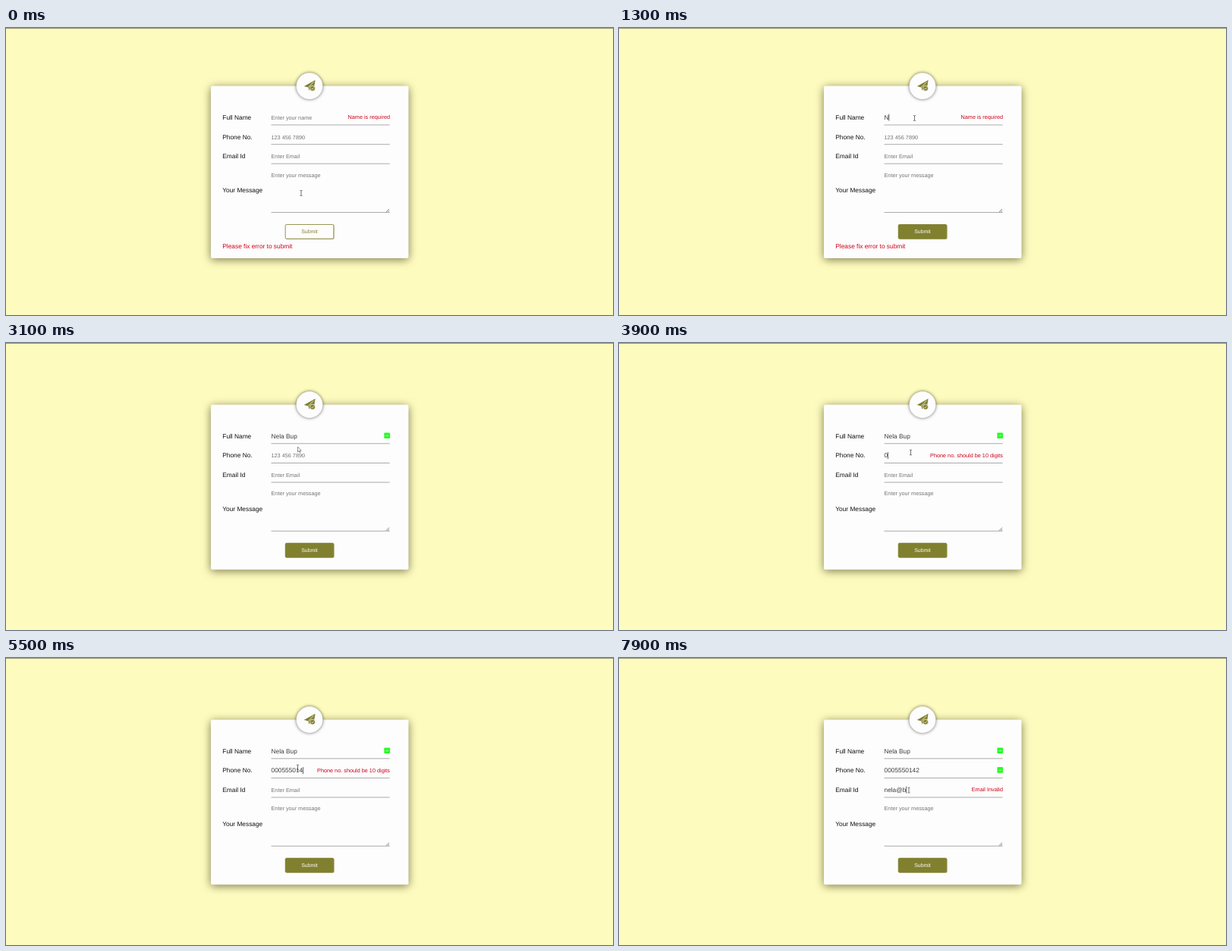
These frames come from a looping animation (800 by 379 pixels, 8000 ms). An HTML page:

```html
<!DOCTYPE html>
<html lang="en">
<head>
<meta charset="utf-8">
<title>Contact form</title>
<style>
  html, body { margin: 0; width: 100%; height: 100%; overflow: hidden; background: #fdfbbe; }
  svg { display: block; width: 100%; height: 100%; }
  text { font-family: "Liberation Sans", Arial, sans-serif; font-size: 8.33px; white-space: pre; text-rendering: geometricPrecision; }
  .label { fill: #111; }
  .hint { fill: #757575; font-size: 7.29px; }
  .value { fill: #3c3c3c; }
  .error { fill: #cc0018; }
  .small { font-size: 7.29px; text-anchor: end; }
  .rule { stroke: #a2a2a2; stroke-width: .9; }
  .card { fill: #fefdfe; filter: drop-shadow(0 2px 6px rgba(45, 43, 10, .62)); }
  .badge { fill: #fefdfe; filter: drop-shadow(0 .5px 2px rgba(0, 0, 0, .6)); }
</style>
</head>
<body>
<svg id="stage" viewBox="0 0 800 379" preserveAspectRatio="none">
  <rect width="800" height="379" fill="#fdfbbe"/>
  <rect width="800" height="1" fill="#98967a"/>
  <rect id="card" class="card" x="270" width="260.5" rx="2"/>
  <g id="form">
    <circle class="badge" cx="400" cy="76.7" r="17.4"/>
    <g fill="#80802f">
      <path d="M392.8 77 407.6 68.8 405.6 81 401.6 79.4 399.4 82.6 398.6 78.6Z"/>
      <path d="M398.4 78.4 405.5 71.2" stroke="#fefdfe" stroke-width=".8"/>
      <circle cx="404" cy="79.7" r="3.5" stroke="#fefdfe" stroke-width=".7"/>
      <path d="M402.4 79.8 403.6 81 405.7 78.6" fill="none" stroke="#fefdfe" stroke-width=".8"/>
    </g>
    <g id="fields"></g>
    <path d="M501 243 505 239M503.3 243 505 241.3" stroke="#555" stroke-width=".7"/>
    <rect x="368.4" y="259.6" width="64.4" height="19.6" rx="2" fill="#80802f" opacity=".45"/>
    <rect id="button" x="368.2" y="259.5" width="63.6" height="18.8" rx="1.5" stroke="#80802f" stroke-width=".8"/>
    <text id="submit" x="400" y="271.2" text-anchor="middle" style="font-size:6.94px">Submit</text>
    <text id="notice" class="error" x="285.3" y="291.4">Please fix error to submit</text>
  </g>
  <path id="caret" stroke="#222" stroke-width=".7"/>
  <g id="pointer">
    <path id="beam" d="M-1.6-3.4H-.5L0-3 .5-3.4H1.6M-1.6 3.4H-.5L0 3 .5 3.4H1.6M0-3V3" fill="none" stroke="#444" stroke-width=".75"/>
    <path id="arrow" d="M-.5-3.5V3.5L1.1 2 2.1 4.2 3.2 3.7 2.2 1.6H4.2Z" fill="#fff" stroke="#555" stroke-width=".65"/>
  </g>
</svg>
<script>
const LOOP = 8000, STEP = 100, LEFT = 349.5, RIGHT = 505.7;
const NOTICE_END = 1500, SHIFT = 4.8;
const $ = id => document.getElementById(id);

const fields = [
  { label: "Full Name", y: 121, hint: "Enter your name", text: "Nela Bup",
    focus: 800, blur: 3400, keys: [1200, 1400, 1500, 1700, 1900, 2200, 2400, 2600],
    status: n => n < 2 ? "Name is required" : n < 6 ? "Write full Name" : "ok" },
  { label: "Phone No.", y: 146.7, hint: "123 456 7890", text: "0005550142",
    focus: 3400, blur: 6700, keys: [3800, 4000, 4200, 4400, 4500, 4800, 5000, 5200, 5400, 5700],
    status: n => !n ? "" : n < 10 ? "Phone no. should be 10 digits" : "ok" },
  { label: "Email Id", y: 172.2, hint: "Enter Email", text: "nela@b",
    focus: 6700, blur: LOOP, keys: [7000, 7200, 7400, 7500, 7700, 7900],
    status: n => n ? "Email Invalid" : "" },
];

// Each stop is [time, x, y].
const pointerPath = [
  [0, 389, 218], [100, 389, 218], [600, 389.5, 119], [2700, 389.5, 119], [3100, 385, 140.5],
  [3300, 384.5, 144.5], [5900, 384.5, 144.5], [6400, 384, 166.5], [6600, 382, 174.5], [LOOP, 382, 174.5],
];

function add(parent, tag, attrs, content = "") {
  const node = document.createElementNS("http://www.w3.org/2000/svg", tag);
  for (const name in attrs) node.setAttribute(name, attrs[name]);
  node.textContent = content;
  return parent.appendChild(node);
}

const addText = (cls, x, y, content) => add($("fields"), "text", { class: cls, x, y }, content);
const addRule = y => add($("fields"), "line", { class: "rule", x1: LEFT, x2: RIGHT, y1: y, y2: y });
const show = (node, on) => node.setAttribute("visibility", on ? "visible" : "hidden");

for (const f of fields) {
  addText("label", 285.3, f.y, f.label);
  f.hintNode = addText("hint", LEFT, f.y - .2, f.hint);
  f.valueNode = addText("value", LEFT, f.y, "");
  f.errorNode = addText("error small", 506, f.y - .9, "");
  addRule(f.y + 7);
  f.tick = add($("fields"), "g", { transform: `translate(498.4 ${f.y - 7.4})` });
  add(f.tick, "rect", { width: 7.7, height: 7.6, rx: .8, fill: "#28fc25" });
  add(f.tick, "path", { d: "M2.2 3.8 3.4 4.4 5.6 3.4", fill: "none", stroke: "#d2ffd0", "stroke-width": .9 });
}
addText("label", 285.3, 217, "Your Message");
addText("hint", LEFT, 196.7, "Enter your message");
addRule(243.5);

function pointerAt(t) {
  const i = Math.max(1, pointerPath.findIndex(stop => stop[0] > t));
  const [t0, x0, y0] = pointerPath[i - 1], [t1, x1, y1] = pointerPath[i];
  const p = (t - t0) / (t1 - t0), ease = p * p * (3 - 2 * p);
  return [x0 + (x1 - x0) * ease, y0 + (y1 - y0) * ease];
}

const mix = (a, b, p) => `rgb(${a.map((v, i) => Math.round(v + (b[i] - v) * p))})`;

function render(t) {
  const notice = t < NOTICE_END, dy = notice ? 0 : SHIFT;
  $("card").setAttribute("y", 76.6 + dy);
  $("card").setAttribute("height", 227.4 - 2 * dy);
  $("form").setAttribute("transform", `translate(0 ${dy})`);
  show($("notice"), notice);

  const fill = Math.min(1, Math.max(0, (t - 700) / 300));
  const white = [254, 253, 254], olive = [128, 128, 47];
  $("button").setAttribute("fill", mix(white, olive, fill));
  $("submit").setAttribute("fill", mix(olive, white, fill));

  show($("caret"), false);
  for (const f of fields) {
    const count = f.keys.filter(k => k <= t).length;
    const status = f.status(count);
    f.valueNode.textContent = f.text.slice(0, count);
    f.errorNode.textContent = status === "ok" ? "" : status;
    show(f.hintNode, !count);
    show(f.tick, status === "ok");
    if (t >= f.focus && t < f.blur) {
      const since = t - (count ? f.keys[count - 1] : f.focus);
      const x = LEFT + .3 + (count ? f.valueNode.getComputedTextLength() : 0);
      $("caret").setAttribute("d", `M${x} ${f.y + dy - 7.4}v9`);
      show($("caret"), since % 1000 < 500);
    }
  }

  const [x, y] = pointerAt(t), between = t >= 2900 && t < 3300;
  $("pointer").setAttribute("transform", `translate(${x} ${y})`);
  show($("arrow"), between);
  show($("beam"), !between);
}

const start = performance.now();
function tick() {
  const t = (performance.now() - start) % LOOP;
  render(Math.floor(t / STEP) * STEP);
  requestAnimationFrame(tick);
}
tick();
</script>
</body>
</html>
```
